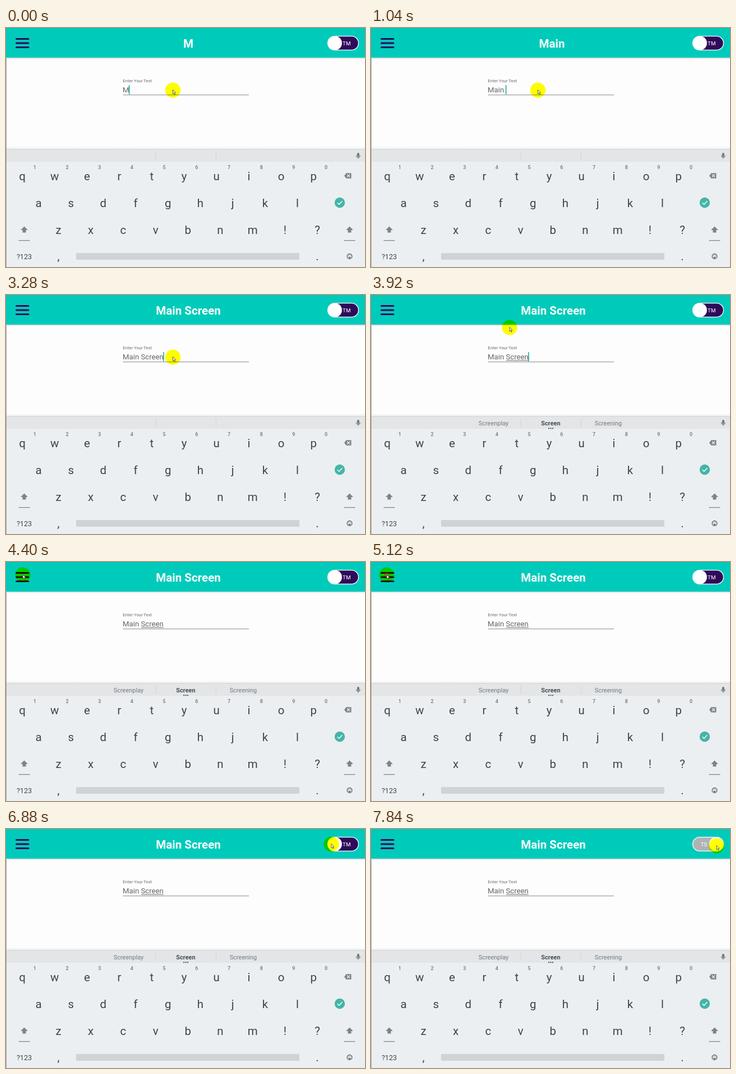
Write an HTML page that moves like this. It is 640 by 427 pixels and loops after 8 s.

```html
<!DOCTYPE html>
<html lang="en">
<head>
<meta charset="utf-8">
<title>Typing a screen title</title>
<style>
  html, body { margin: 0; width: 100%; height: 100%; overflow: hidden; background: #fdfdfd; }
  svg { display: block; width: 100vw; height: 100vh; font-family: Roboto, sans-serif; }
  text { white-space: pre; }
  .mid, #keys text { text-anchor: middle; }
  #keys { fill: #37474f; }
  #keys .digit { font-size: 9px; font-weight: 500; fill: #6b767c; }
  #glow { fill: #ff0; mix-blend-mode: multiply; }
</style>
</head>
<body>
<svg viewBox="0 0 640 427">
  <defs>
    <linearGradient id="shade" x2="0" y2="1">
      <stop stop-color="#000" stop-opacity=".16"/>
      <stop offset="1" stop-color="#000" stop-opacity="0"/>
    </linearGradient>
    <path id="shift" d="M0-6 6.5.5H3V5H-3V.5H-6.5Z M-10 18.5H10V19.7H-10Z"/>
  </defs>
  <rect width="640" height="427" fill="#fdfdfd"/>

  <!-- header -->
  <rect width="640" height="53" fill="#00cbbb"/>
  <rect y="53" width="640" height="3" fill="url(#shade)"/>
  <path d="M18.5 19.6H40M18.5 27H40M18.5 34.4H40" stroke="#2b0a5c" stroke-width="3" stroke-linecap="round"/>
  <text id="title" class="mid" x="325" y="34.7" font-size="20.6" font-weight="700" fill="#fff"></text>
  <g id="switch">
    <rect id="track" x="573.6" y="14.6" width="54.8" height="24.8" rx="12.4" stroke="#fff" stroke-width="1.3"/>
    <text id="mode" class="mid" y="30.6" font-size="9.8" fill="#fff"></text>
    <circle id="thumb" cy="27" r="12.6" fill="#fff"/>
  </g>

  <!-- text field -->
  <text x="208.3" y="96.7" font-size="7.7" fill="#6a6a6a">Enter Your Text</text>
  <text id="field" x="208" y="115" font-size="13.2" fill="#636363"></text>
  <path d="M208.5 119.6H433" stroke="#8c8c8c"/>
  <rect id="caret" y="102" width="1.5" height="16.5" fill="#12a594"/>

  <!-- keyboard -->
  <rect y="213" width="640" height="3" fill="#f3f4f4"/>
  <rect y="216" width="640" height="211" fill="#eceff1"/>
  <rect y="216" width="640" height="23" fill="#e3e5e7"/>
  <rect y="216" width="640" height="2.5" fill="url(#shade)" opacity=".4"/>
  <path d="M267 221V236M374.5 221V236" stroke="#d3d7d9"/>
  <g id="hints" class="mid" font-size="11" fill="#757b7f">
    <path d="M241 117H281" stroke="#636363"/>
    <text x="218.5" y="233">Screenplay</text>
    <text x="320.5" y="233" font-weight="700" fill="#455157">Screen</text>
    <text x="423" y="233">Screening</text>
    <path d="M316.2 237.2h2v2h-2zM319.6 237.2h2v2h-2zM323 237.2h2v2h-2z" fill="#455157"/>
  </g>
  <g fill="none" stroke="#6b7479" stroke-width="1.1">
    <rect x="626.6" y="223.6" width="2.6" height="5.6" rx="1.3" fill="#6b7479"/>
    <path d="M624.6 227.5a3.3 3.6 0 0 0 6.6 0M627.9 231V233.5"/>
  </g>
  <g id="keys"></g>
  <rect x="125" y="402" width="398" height="12" rx="1" fill="#cfd3d5"/>
  <path d="M603 264 606.5 259.3H615.5V268.7H606.5Z" fill="#7a858a"/>
  <path d="M608 261.5 613 266.5M613 261.5 608 266.5" stroke="#eceff1" stroke-width="1.3"/>
  <circle cx="595" cy="312" r="9.2" fill="#45b5a8"/>
  <path d="M590.8 312.2 593.8 315.2 599.4 309.2" fill="none" stroke="#fff" stroke-width="1.4"/>
  <g fill="#7a858a"><use href="#shift" x="32.5" y="360.5"/><use href="#shift" x="612.5" y="360.5"/></g>
  <g fill="none" stroke="#37474f" stroke-width="1.1">
    <circle cx="612.5" cy="408" r="4.4"/>
    <path d="M609.9 409.2H615.1A2.7 2.4 0 0 1 609.9 409.2Z" fill="#37474f" stroke="none"/>
    <path d="M610.3 406.7h1.3M613.4 406.7h1.3"/>
  </g>
  <path d="M.5 54V427" stroke="#a4a7a8"/>

  <!-- pointer -->
  <circle id="glow" r="13.6"/>
  <circle id="ring" fill="none" stroke="#e0202a" stroke-width="1.6"/>
  <path id="arrow" d="M0 0V7.2L1.7 5.7 2.9 8.6 4.1 8.1 2.9 5.3H5Z" fill="#fff" stroke="#3c3c3c" stroke-width=".8"/>
</svg>
<script>
const $ = id => document.getElementById(id);
const set = (el, attrs) => { for (const k in attrs) el.setAttribute(k, attrs[k]); };
const clamp = (v, lo, hi) => Math.min(hi, Math.max(lo, v));

function key(label, x, y, attrs = {}) {
  const el = document.createElementNS('http://www.w3.org/2000/svg', 'text');
  el.textContent = label;
  set(el, { x, y, 'font-size': 20.5, ...attrs });
  $('keys').append(el);
}
[['qwertyuiop', 29, 271.5], ['asdfghjkl', 58, 319.5], ['zxcvbnm!?', 93.5, 367.5]]
  .forEach(([row, x, y]) => [...row].forEach((c, i) => key(c, x + i * 57.7, y)));
[...'1234567890'].forEach((c, i) => key(c, 51.3 + i * 57.7, 252, { class: 'digit' }));
key('?123', 32.5, 412.5, { 'font-size': 12.6 });
key(',', 93.5, 415);
key('.', 555, 415);

const LOOP = 8000, PHRASE = 'Main Screen', HINTS = 3640, BLINK = 460;
const TYPED = [0, 300, 620, 940, 980, 2040, 2480, 2580, 2860, 3040, 3190];
const TITLE_LAG = 50;
const typed = t => TYPED.filter(k => k <= t).length;

// time, x, y
const PATH = [
  [0, 297.5, 111], [3590, 297.5, 111], [3920, 247, 58], [4400, 30, 23], [4600, 28, 22],
  [5120, 28, 23], [5300, 28, 23], [5700, 170, 15], [6160, 446, 12], [6560, 584, 20],
  [6880, 580, 27], [7040, 580, 27], [7500, 616, 30], [8000, 616, 30]
];
const slope = (i, d) => (PATH[i + 1][d] - PATH[i][d]) / (PATH[i + 1][0] - PATH[i][0]);
function tangent(i, d) {
  if (i < 1 || i > PATH.length - 2) return 0;
  const a = slope(i - 1, d), b = slope(i, d);
  return a * b > 0 ? 2 * a * b / (a + b) : 0;
}
// Smooth curve through the points, without overshoot
function pointer(t, d) {
  const i = PATH.findIndex((p, n) => n + 1 === PATH.length - 1 || t < PATH[n + 1][0]);
  const [p, q] = [PATH[i], PATH[i + 1]], h = q[0] - p[0], u = (t - p[0]) / h;
  const s = u * u * (3 - 2 * u);
  return p[d] + (q[d] - p[d]) * s
    + h * (tangent(i, d) * u * (1 - u) ** 2 - tangent(i + 1, d) * u * u * (1 - u));
}

function draw(t) {
  const count = typed(t);
  $('field').textContent = PHRASE.slice(0, count);
  $('title').textContent = PHRASE.slice(0, Math.max(1, typed(t - TITLE_LAG)));
  $('hints').style.display = t < HINTS ? 'none' : '';

  const since = t - (t < HINTS ? TYPED[count - 1] : HINTS);
  set($('caret'), {
    x: 207.4 + $('field').getComputedTextLength(),
    opacity: Math.floor(since / BLINK) % 2 ? 0 : 1
  });

  const x = pointer(t, 1), y = pointer(t, 2);
  const drag = t < 7040 ? 0 : clamp((x - 580) / 36, 0, 1), on = drag > .5;
  set($('thumb'), { cx: 586.3 + 29 * drag });
  set($('track'), { fill: on ? '#b1b3b3' : '#2f0a5a' });
  set($('mode'), { x: on ? 593.5 : 607.3 });
  $('mode').textContent = on ? 'TS' : 'TM';

  const click = (t - 5060) / 220;
  set($('ring'), { cx: x, cy: y, r: 1 + 6 * clamp(click, 0, 1), opacity: click > 0 && click < 1 ? 1 - click : 0 });
  set($('glow'), { cx: x, cy: y });
  set($('arrow'), { transform: `translate(${x} ${y - 0.5})` });
}

let start;
function frame(now) {
  start ??= now;
  draw((now - start) % LOOP);
  requestAnimationFrame(frame);
}
draw(0);
requestAnimationFrame(frame);
</script>
</body>
</html>
```
